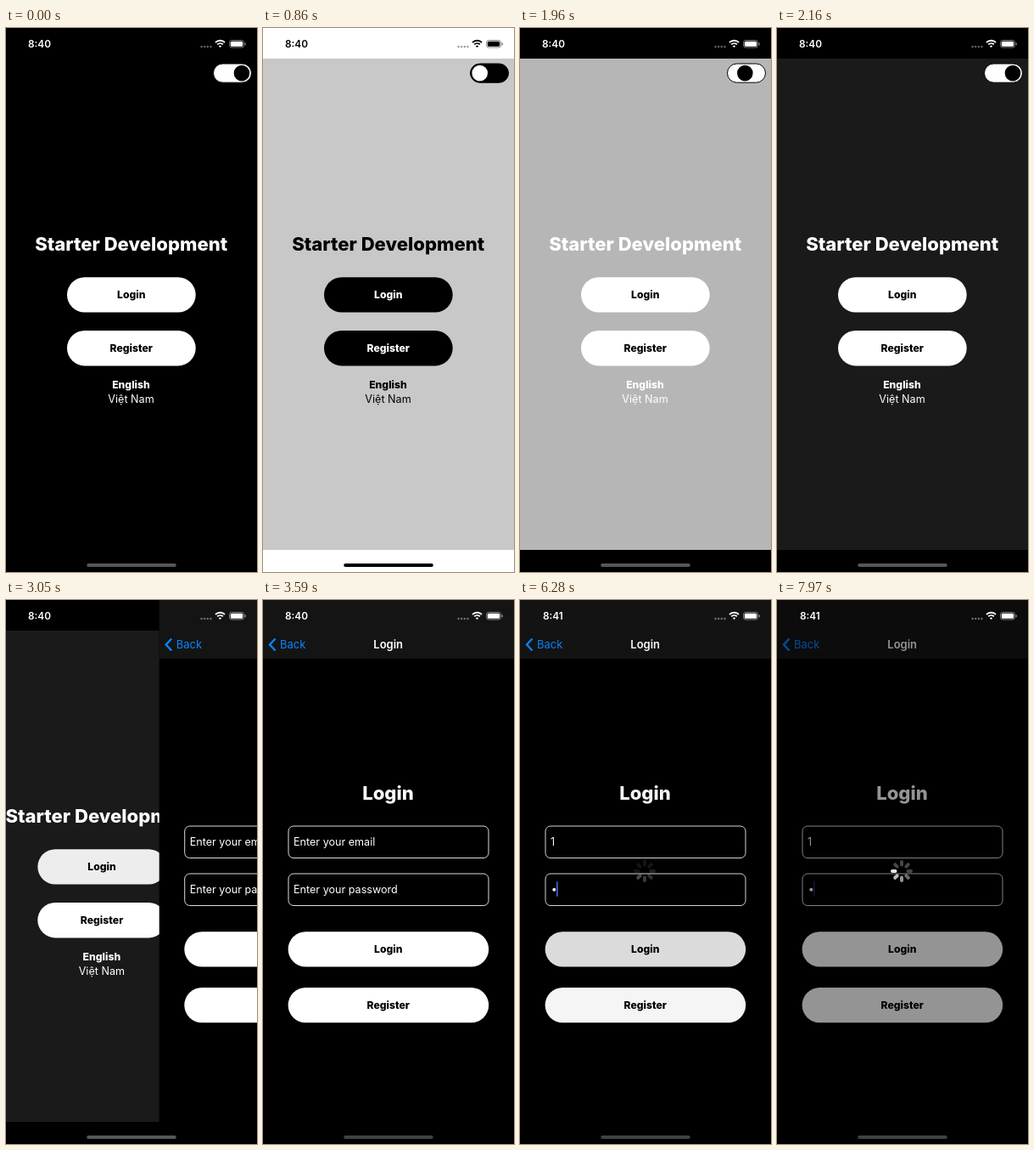
An HTML page for the animation above (8000 ms loop, 296 px wide and 640 px high).

```html
<!DOCTYPE html>
<html lang="en">
<head>
<meta charset="utf-8">
<title>Theme switch and login</title>
<style>
  html, body { margin: 0; width: 100%; height: 100%; overflow: hidden; background: #000; }
  svg { display: block; width: 296px; height: 640px; --bg: #000; --fg: #fff; }
  text { font: 12.6px Inter, "Open Sans", sans-serif; fill: var(--fg); }
  .mid { text-anchor: middle; }
  .bold { font-weight: 800; font-size: 12.2px; }
  .title { font-size: 22.1px; }
  .nav { font-size: 13px; }
  .semi { font-weight: 600; }
  .clock { font-size: 11.8px; font-weight: 600; fill: currentColor; }
  .page { fill: var(--bg); }
  .button rect { fill: var(--fg); }
  .button text { fill: var(--bg); }
  .field { fill: none; stroke: #ddd; }
  .caret { fill: #4464e0; }
</style>
</head>
<body>
<svg viewBox="0 0 296 640">
  <g id="home">
    <rect class="page" width="296" height="640"/>
    <rect id="body" y="36" width="296" height="578"/>
    <rect x="244.5" y="42" width="45" height="22.2" rx="11.1" fill="var(--fg)" stroke="#000"/>
    <circle id="knob" cy="53.1" r="9.3" fill="var(--bg)"/>
    <text class="mid bold title" x="147.7" y="262">Starter Development</text>
    <g class="button" id="openLogin">
      <rect x="72" y="293.2" width="151.7" height="41.4" rx="20.7"/>
      <text class="mid bold" x="147.7" y="318.3">Login</text>
    </g>
    <g class="button">
      <rect x="72" y="356" width="151.7" height="41.4" rx="20.7"/>
      <text class="mid bold" x="147.7" y="381.2">Register</text>
    </g>
    <text class="mid bold" x="147.5" y="424">English</text>
    <text class="mid" x="147.5" y="441">Việt Nam</text>
  </g>

  <g id="login">
    <rect width="296" height="640"/>
    <rect width="296" height="69" fill="#141414"/>
    <path d="M14.5 45.5L8 52.5l6.5 7" fill="none" stroke="#0a84ff" stroke-width="2.4"/>
    <text class="nav" x="20" y="57" style="fill:#0a84ff">Back</text>
    <text class="mid nav semi" x="147.7" y="57">Login</text>
    <text class="mid bold title" x="147.5" y="235">Login</text>
    <rect class="field" x="30" y="266" width="236" height="37.5" rx="6"/>
    <rect class="field" x="30" y="322" width="236" height="37.5" rx="6"/>
    <text id="email" x="36" y="289"></text>
    <text id="password" x="36" y="345">Enter your password</text>
    <circle id="bullet" cx="40.3" cy="340.7" r="2" fill="#fff"/>
    <rect class="caret" id="emailCaret" y="276" width="1.7" height="17.5"/>
    <rect class="caret" id="passwordCaret" y="331.3" width="1.7" height="17.5"/>
    <g class="button" id="submit">
      <rect x="29.6" y="390.2" width="236.6" height="41.4" rx="20.7"/>
      <text class="mid bold" x="147.7" y="415.3">Login</text>
    </g>
    <g class="button">
      <rect x="29.6" y="455.9" width="236.6" height="41.4" rx="20.7"/>
      <text class="mid bold" x="147.7" y="481">Register</text>
    </g>
  </g>

  <rect id="shade" width="296" height="640"/>
  <g id="spinner" transform="translate(147 319)" stroke="#fff" stroke-width="4" stroke-linecap="round"></g>

  <g id="status" fill="currentColor">
    <text class="clock" id="clock" y="23"></text>
    <g opacity=".4">
      <circle cx="230.6" cy="22" r="1.2"/><circle cx="234.2" cy="22" r="1.2"/>
      <circle cx="237.8" cy="22" r="1.2"/><circle cx="241.4" cy="22" r="1.2"/>
    </g>
    <g fill="none" stroke="currentColor" stroke-width="1.8">
      <path d="M247 17a7.8 7.8 0 0 1 11 0M249.2 19.4a4.7 4.7 0 0 1 6.6 0"/>
      <rect x="263.5" y="14.5" width="17" height="8.5" rx="2.6" stroke-width="1" opacity=".45"/>
    </g>
    <path d="M250.8 21.2a2.5 2.5 0 0 1 3.4 0l-1.7 1.8z"/>
    <rect x="264.8" y="15.8" width="14.4" height="5.9" rx="1.5"/>
    <rect x="281.6" y="17.2" width="1.3" height="3.2" rx=".6" opacity=".5"/>
  </g>
  <rect id="indicator" x="95.2" y="629.9" width="105.6" height="4" rx="2"/>
</svg>

<script>
const LOOP = 8000;
const svg = document.querySelector('svg');
const el = {};
for (const node of svg.querySelectorAll('[id]')) el[node.id] = node;

const set = (node, name, value) => node.setAttribute(name, value);
const fade = (node, value) => set(node, 'opacity', value);
const label = (node, value) => { if (node.textContent !== value) node.textContent = value; };
const ramp = (t, start, length) => Math.min(1, Math.max(0, (t - start) / length));
const within = (t, start, end) => t >= start && t < end;

const spokes = Array.from({ length: 8 }, (_, i) => {
  const spoke = document.createElementNS(svg.namespaceURI, 'path');
  set(spoke, 'd', 'M0-11V-7.5');
  set(spoke, 'transform', `rotate(${i * 45})`);
  return el.spinner.appendChild(spoke);
});

// Opacity of a touched button: quick dip, slower recovery
const press = (t, start) => 1 - 0.55 * (ramp(t, start, 100) - ramp(t, start + 110, 200));

function drawTheme(t) {
  const light = within(t, 610, 1870);
  svg.style.setProperty('--bg', light ? '#fff' : '#000');
  svg.style.setProperty('--fg', light ? '#000' : '#fff');
  set(el.status, 'color', within(t, 500, 1750) ? '#000' : '#fff');

  // The return to dark stops just short of black
  const level = t < 1870 ? ramp(t, 610, 320) : Math.max(0.1, 1 - ramp(t, 1870, 320));
  const grey = Math.round(255 * level);
  set(el.body, 'fill', `rgb(${grey},${grey},${grey})`);

  const slide = ramp(t, 610, 200) - ramp(t, 1870, 200);
  set(el.knob, 'cx', 278 - 22.3 * slide * slide * (3 - 2 * slide));
  set(el.indicator, 'fill', light ? '#000' : t < 3400 ? '#575757' : '#424242');
}

function drawPush(t) {
  const p = 1 - (1 - ramp(t, 2960, 600)) ** 3;
  set(el.home, 'transform', `translate(${-89 * p})`);
  set(el.login, 'transform', `translate(${296 * (1 - p)})`);
  fade(el.openLogin, press(t, 2770));
  label(el.clock, t < 3860 ? '8:40' : '8:41');
  set(el.clock, 'x', t < 3860 ? 26 : 27);
}

function drawForm(t) {
  label(el.email, t < 4310 ? 'Enter your email' : '1');
  set(el.emailCaret, 'x', t < 4310 ? 36.5 : 40);
  fade(el.emailCaret, within(t, 4030, 5160) ? (t < 4950 ? 1 : 0.4) : 0);

  const typed = t >= 5280;
  fade(el.password, typed ? 0 : 1);
  fade(el.bullet, typed ? 1 : 0);
  set(el.passwordCaret, 'x', typed ? 43 : 36.5);
  const blink = t < 6180 ? within(t, 5160, 5910) : 1 - ramp((t - 6180) % 1000, 700, 150);
  fade(el.passwordCaret, Number(blink));
  fade(el.submit, press(t, 6010));
}

function drawLoading(t) {
  const q = ramp(t, 6230, 570);
  fade(el.shade, 0.42 * q);
  fade(el.spinner, Math.min(1, 3.5 * q));
  const head = Math.floor(t / 100) + 7;
  spokes.forEach((spoke, i) => {
    const age = (head - i) % 8;
    fade(spoke, Math.max(0.27, 0.9 - 0.16 * age));
  });
}

function frame() {
  const t = performance.now() % LOOP;
  drawTheme(t);
  drawPush(t);
  drawForm(t);
  drawLoading(t);
  requestAnimationFrame(frame);
}
frame();
</script>
</body>
</html>
```
